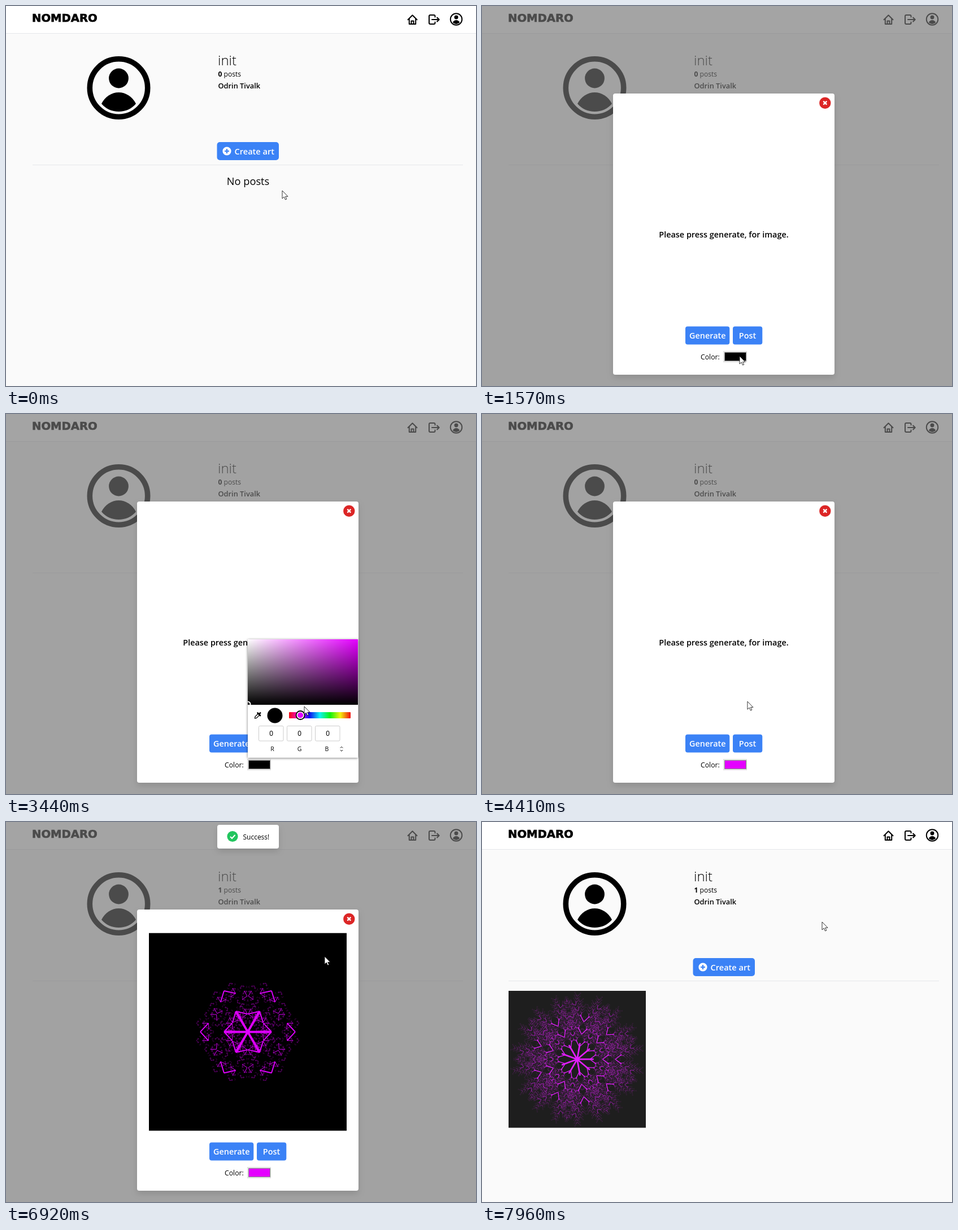
These frames come from a looping animation (832x673 px, 8 s). An HTML page:

```html
<!DOCTYPE html>
<html lang="en">
<head>
<meta charset="utf-8">
<title>Art profile</title>
<style>
  html, body { margin: 0; width: 100%; height: 100%; overflow: hidden; background: #fafafa; }
  svg { display: block; width: 832px; height: 673px; }
  text { font: 600 14.4px "Open Sans", "Noto Sans", sans-serif; white-space: pre; }
  .mid { text-anchor: middle; }
  .btn { fill: #3b82f6; }
  .white { fill: #fff; }
  .brand { font: 700 19.6px "DejaVu Sans", sans-serif; stroke: #000; stroke-width: .7; }
  .user { font-weight: 300; font-size: 24px; }
  .small { font-size: 12.1px; font-weight: 400; }
  .small tspan { font-weight: 700; }
  .field { font: 12px "Liberation Sans", Arial, sans-serif; text-anchor: middle; }
  .label { font-size: 10.5px; font-weight: 400; }
  .line { fill: none; stroke: #000; stroke-width: 2; stroke-linejoin: round; stroke-linecap: round; }
</style>
</head>
<body>
<svg viewBox="0 0 832 673" xmlns="http://www.w3.org/2000/svg">
  <defs>
    <filter id="shadow" x="-20%" y="-20%" width="140%" height="150%">
      <feDropShadow dx="0" dy="5" stdDeviation="6" flood-opacity=".13"/>
    </filter>
    <filter id="popShadow" x="-10%" y="-10%" width="120%" height="120%">
      <feDropShadow dx="0" dy="1" stdDeviation="2" flood-opacity=".55"/>
    </filter>
    <linearGradient id="whiten"><stop stop-color="#fff"/><stop offset="1" stop-color="#fff" stop-opacity="0"/></linearGradient>
    <linearGradient id="darken" x2="0" y2="1"><stop stop-opacity="0"/><stop offset="1"/></linearGradient>
    <linearGradient id="rainbow"></linearGradient>
    <clipPath id="field"><rect x="428" y="399" width="195" height="116"/></clipPath>
    <g id="person">
      <circle r="51.2" fill="none" stroke="#000" stroke-width="9.6"/>
      <circle cy="-17" r="17.4"/>
      <path d="M-30.5 28C-24 15-12 8 0 8S24 15 30.5 28C23 37 12 42 0 42S-23 37-30.5 28Z"/>
    </g>
    <g id="bloom"></g>
    <g id="star"></g>
  </defs>

  <rect width="832" height="673" fill="#fafafa"/>
  <rect width="832" height="48" class="white"/>
  <path d="M0 48.5H832M47 281.5H809" stroke="#e5e7eb"/>
  <text class="brand" x="46" y="28">NOMDARO</text>
  <path class="line" d="M711.5 24.2 719.5 16.2 727.5 24.2M713.8 22.5V32H725.2V22.5M717.5 32V26.5H721.5V32"/>
  <path class="line" d="M759.5 19.5V18Q759.5 16 757.5 16H751Q749 16 749 18V30Q749 32 751 32H757.5Q759.5 32 759.5 30V28.5M754 24H766.5M763.2 20.5 766.7 24 763.2 27.5"/>
  <use href="#person" transform="translate(797 23.5) scale(.2)"/>
  <use href="#person" transform="translate(199.5 145)"/>
  <text class="user" x="375" y="105">init</text>
  <text class="small" x="375.5" y="125"><tspan id="count">0</tspan> posts</text>
  <text x="375.5" y="146" style="font-size:12.8px">Odrin Tivalk</text>
  <rect class="btn" x="373.5" y="241" width="109.5" height="32" rx="5"/>
  <circle class="white" cx="391" cy="257" r="7.6"/>
  <path d="M387 257H395M391 253V261" stroke="#3b82f6" stroke-width="2.2"/>
  <text class="white" x="404.5" y="263" style="font-size:14.6px">Create art</text>
  <text id="empty" class="mid" x="428.5" y="317" style="font-size:18.2px;font-weight:500">No posts</text>
  <g id="thumb">
    <rect x="47" y="299" width="243" height="242.5"/>
    <use href="#bloom" transform="translate(168.5 420.2) scale(.694)"/>
  </g>

  <rect id="dim" width="832" height="673" fill="#737373"/>

  <g id="modal">
    <rect class="white" x="232" y="155" width="392" height="498" rx="4" filter="url(#shadow)"/>
    <circle cx="607.3" cy="171.7" r="10.2" fill="#dc2626"/>
    <path d="M604.3 168.7 610.3 174.7M610.3 168.7 604.3 174.7" stroke="#fff" stroke-width="2.4"/>
    <text id="hint" class="mid" x="428" y="410">Please press generate, for image.</text>
    <g id="art">
      <rect x="253" y="196.7" width="350" height="350"/>
      <use id="bloomArt" href="#bloom" x="428" y="371.7"/>
      <use id="starArt" href="#star" x="428" y="371.7"/>
    </g>
    <rect class="btn" x="360" y="567.5" width="78.3" height="32" rx="4"/>
    <text class="white mid" x="399.3" y="589">Generate</text>
    <rect id="post" class="btn" x="444" y="567.5" width="52.3" height="32" rx="4"/>
    <text class="white mid" x="470" y="589">Post</text>
    <text x="387" y="626" style="font-size:12.2px;font-weight:500">Color:</text>
    <rect x="427.5" y="611.5" width="41" height="19" fill="#efefef" stroke="#ddd"/>
    <rect id="swatch" x="429.5" y="613.5" width="38" height="15" stroke="#888"/>
  </g>

  <g id="picker">
    <rect x="428" y="399" width="195" height="209.5" fill="#fff" filter="url(#popShadow)"/>
    <g clip-path="url(#field)">
      <rect id="hueField" x="428" y="399" width="195" height="116"/>
      <rect x="428" y="399" width="195" height="116" fill="url(#whiten)"/>
      <rect x="428" y="399" width="195" height="116" fill="url(#darken)"/>
      <circle id="handle" r="4.5" fill="none" stroke="#fff" stroke-width="2"/>
    </g>
    <path d="M440.5 539 441 536 446.5 530.5 449 533 443.5 538.5Z" fill="none" stroke="#000" stroke-width="1.3"/>
    <path d="M445.5 529.5 450 534M448 531.5 450.2 529.3" stroke="#000" stroke-width="2.6" stroke-linecap="round"/>
    <circle id="preview" cx="476" cy="534" r="13.5"/>
    <rect x="501" y="528" width="109" height="11" rx="1" fill="url(#rainbow)"/>
    <g id="thumbHue">
      <circle r="7.5" fill="#fff" stroke="#000" stroke-width="1.8"/>
      <circle id="hueDot" r="5"/>
    </g>
    <g id="inputs"></g>
    <path d="M591.8 591.5 594 589.3 596.2 591.5M591.8 595 594 597.2 596.2 595" fill="none" stroke="#000"/>
  </g>

  <g id="toast">
    <rect class="white" x="374" y="5" width="109" height="42" rx="4" filter="url(#shadow)"/>
    <circle cx="401" cy="25.5" r="9.6" fill="#22c55e"/>
    <path d="M397 26 400 29 405.5 23" fill="none" stroke="#fff" stroke-width="2"/>
    <text x="419.5" y="31" style="font-size:12px;font-weight:500">Success!</text>
  </g>

  <g id="pointer">
    <circle id="glow" r="13" fill="#f2e62e" fill-opacity=".6"/>
    <path id="arrow" d="M0 0V14L3.3 11 5.5 16 7.8 15 5.6 10.3H10Z" fill="#fff" stroke="#000" stroke-width=".8"/>
    <path id="hand" d="M-1.5 11V1Q-1.5 0 0 0T1.5 1V6.5Q3 5.6 4 7 5.6 6.4 6.4 8 8 7.7 8 9.5V13.5Q8 16 6.5 18.5H-.5Q-2 15.5-5 11.5-5.5 9.5-3.5 9.5Z" fill="#fff" stroke="#000" stroke-width=".9"/>
  </g>
</svg>
<script>
const LOOP = 8000, SVG = "http://www.w3.org/2000/svg";
const $ = id => document.getElementById(id);
const clamp = (v, lo = 0, hi = 1) => Math.min(hi, Math.max(lo, v));
const ramp = (t, from, to) => clamp((t - from) / (to - from));
const ease = u => u * u * (3 - 2 * u);
const within = (t, spans) => spans.some(([from, to]) => t >= from && t < to);
const set = (id, attrs) => { for (const key in attrs) $(id).setAttribute(key, attrs[key]); };
const show = (id, on) => set(id, { display: on ? "inline" : "none" });

function add(parent, name, attrs, text = "") {
  const node = document.createElementNS(SVG, name);
  for (const key in attrs) node.setAttribute(key, attrs[key]);
  node.textContent = text;
  return $(parent).appendChild(node);
}

// Each branch forks in mirrored pairs at even steps along its reach.
function drawFractal(id, { arms, reach, forks, spread, scale, depth, width }) {
  const levels = Array(depth + 1).fill("");
  const branch = (x, y, angle, size, level) => {
    const c = Math.cos(angle) * size, s = Math.sin(angle) * size;
    levels[level] += `M${x.toFixed(2)} ${y.toFixed(2)}l${(42 * c).toFixed(2)} ${(42 * s).toFixed(2)}`;
    if (level === depth) return;
    for (let i = 1; i <= forks; i++) {
      const r = reach * i / forks;
      for (const turn of [spread, -spread]) branch(x + r * c, y + r * s, angle + turn, size * scale, level + 1);
    }
  };
  for (let i = 0; i < arms; i++) branch(0, 0, i * 2 * Math.PI / arms, 1, 0);
  levels.forEach((d, level) => add(id, "path", {
    d, fill: "none", stroke: "#e000ff", "stroke-width": width * scale ** level
  }));
}
drawFractal("bloom", { arms: 9, reach: 97, forks: 3, spread: 0.64, scale: 0.485, depth: 4, width: 3.9 });
drawFractal("star", { arms: 6, reach: 84, forks: 2, spread: 2.32, scale: 0.5, depth: 4, width: 3.9 });

for (let i = 0; i <= 12; i++)
  add("rainbow", "stop", { offset: i / 12, "stop-color": `hsl(${360 - i * 30} 90% 50%)` });

const fields = ["R", "G", "B"].map((name, i) => {
  const x = 447.5 + i * 50;
  add("inputs", "rect", { x, y: 552.5, width: 43.5, height: 26.5, rx: 2, fill: "#fff", stroke: "#ccc" });
  add("inputs", "text", { x: 471.5 + i * 48.2, y: 597, class: "label mid" }, name);
  return add("inputs", "text", { x: x + 22, y: 570, class: "field" });
});

// time, x, y of the pointer tip
const PATH = [
  [0, 489, 327], [350, 421, 264], [950, 421, 264], [1430, 456, 620], [1700, 456, 620],
  [2270, 516, 531], [2410, 516, 531], [3030, 522.5, 533], [3160, 522.5, 533], [3440, 528, 518],
  [3800, 620, 374], [3930, 624, 366], [3990, 624, 370], [4690, 387, 584], [5430, 387, 584],
  [5630, 486, 582], [6300, 486, 582], [6920, 564, 238], [7060, 588, 191], [7270, 604, 173],
  [7800, 604, 173], [7890, 602, 177], [LOOP, 602, 177]
];
const PRESSED = [[680, 820], [1590, 1710], [2330, 3040], [3600, 3930], [5900, 6030], [7750, 7830]];
const HAND = [[250, 900], [4620, 6400], [7180, 7850]];

function tipAt(t) {
  const i = Math.max(1, PATH.findIndex(p => p[0] >= t));
  const [t0, x0, y0] = PATH[i - 1], [t1, x1, y1] = PATH[i];
  const u = ease(ramp(t, t0, t1));
  return { x: x0 + (x1 - x0) * u, y: y0 + (y1 - y0) * u };
}

function hsvToRgb(h, s, v) {
  const channel = n => {
    const k = (n + h / 60) % 6;
    return Math.round(255 * v * (1 - s * clamp(Math.min(k, 4 - k))));
  };
  return [channel(5), channel(3), channel(1)];
}

function drawPicker(t) {
  const hueX = t < 2340 ? 610 : tipAt(Math.min(t, 3030)).x - 1.4;
  const hue = 360 - (hueX - 501) * 3.3;
  let x = 428, y = 514, value = 0;
  if (t >= 3600) {
    const tip = tipAt(Math.min(t, 3930));
    x = clamp(tip.x, 428, 622);
    y = clamp(tip.y, 399, 515);
    value = (515 - y) / 116;
  }
  const rgb = hsvToRgb(hue, (x - 428) / 194, value);
  const fill = `rgb(${rgb})`, pure = `hsl(${hue} 100% 50%)`;
  set("hueField", { fill: pure });
  set("hueDot", { fill: pure });
  set("thumbHue", { transform: `translate(${clamp(hueX, 507, 604)} 533.5)` });
  set("handle", { cx: x, cy: y });
  set("preview", { fill });
  set("swatch", { fill });
  fields.forEach((field, i) => { field.textContent = rgb[i]; });
  show("picker", t >= 1640 && t < 4400);
}

function drawPointer(t) {
  const { x, y } = tipAt(t), hand = within(t, HAND);
  set("pointer", { transform: `translate(${x} ${y})` });
  show("glow", within(t, PRESSED));
  show("hand", hand);
  show("arrow", !hand);
}

function render(t) {
  const open = ease(ramp(t, 680, 980)) * (1 - ease(ramp(t, 7810, 7955)));
  const grow = 0.95 + 0.05 * open;
  set("dim", { opacity: 0.65 * open });
  set("modal", { opacity: open, transform: `translate(428 404) scale(${grow}) translate(-428 -404)` });

  const generated = t >= 5020, posted = t >= 6300;
  $("count").textContent = posted ? 1 : 0;
  show("empty", !posted);
  show("hint", !generated);
  show("art", generated);
  show("bloomArt", !posted);
  show("starArt", posted);
  set("post", { style: t >= 5900 && t < 6030 ? "fill:#2563eb" : "" });
  show("thumb", t >= 7610);
  set("thumb", { opacity: 0.3 + 0.58 * ramp(t, 7610, 7960) });

  const pop = ease(ramp(t, 6270, 6560));
  set("toast", {
    opacity: pop * (1 - ramp(t, 7830, 7955)),
    transform: `translate(428 26) scale(${0.7 + 0.3 * pop}) translate(-428 -26)`
  });
  drawPicker(t);
  drawPointer(t);
}

const start = performance.now();
function tick() {
  render((performance.now() - start) % LOOP);
  requestAnimationFrame(tick);
}
tick();
</script>
</body>
</html>
```
